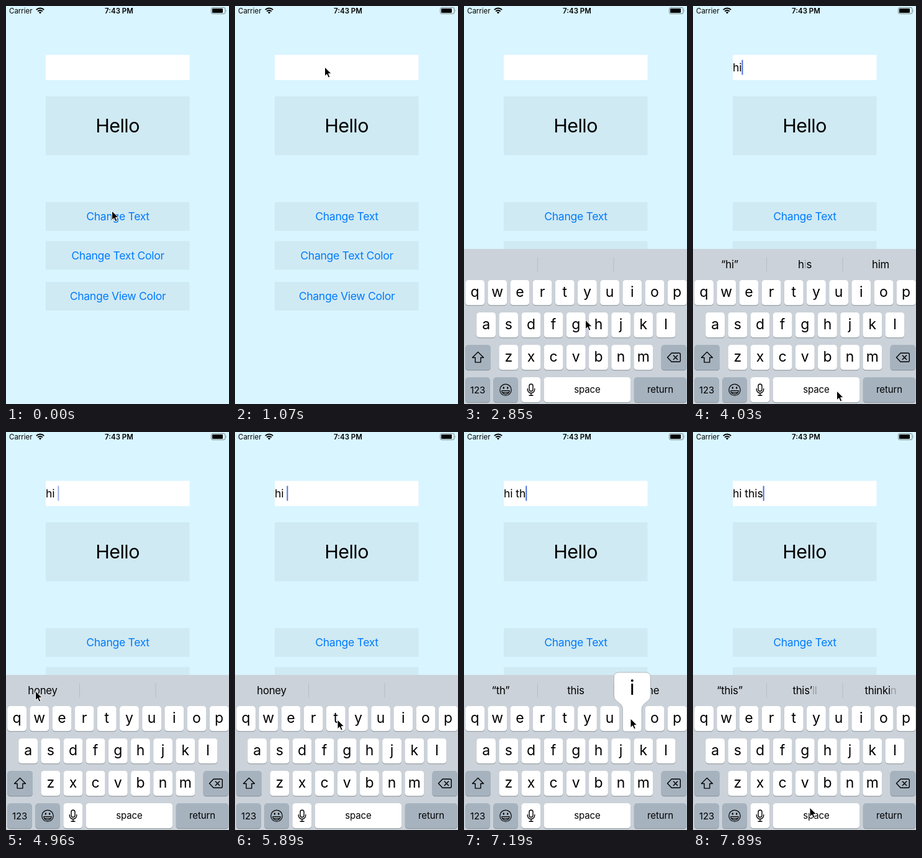
An HTML page that plays this animation: 359 px wide and 639 px high, repeating every 8 s.

```html
<!DOCTYPE html>
<html lang="en">
<head>
<meta charset="utf-8">
<title>Text field demo</title>
<style>
  html, body { margin: 0; width: 100%; height: 100%; overflow: hidden; background: #d9f5ff; }
  svg { display: block; font-family: Inter, "Open Sans", sans-serif; }
  text { white-space: pre; }
  .mid { text-anchor: middle; }
  .button { font-size: 17.6px; letter-spacing: -.32px; fill: #007aff; }
  .letter { font-size: 23px; }
  .word { font-size: 15px; letter-spacing: -.15px; }
  .guess { font-size: 16.8px; letter-spacing: -.25px; }
  .line { fill: none; stroke: #000; stroke-width: 1.4; stroke-linejoin: round; stroke-linecap: round; }
</style>
</head>
<body>
<svg id="stage" width="359" height="639" viewBox="0 0 359 639"></svg>
<script>
const LOOP = 8000, STEP = 117.35, KEYS_START = 1780;
const KEY_W = 30.8, KEY_H = 40.3, PITCH = 36.17;
const keyPos = {};

const rect = (x, y, w, h, fill, r = 0) =>
  `<rect x="${x}" y="${y}" width="${w}" height="${h}" rx="${r}" fill="${fill}"/>`;
const label = (x, y, cls, str, extra = '') => `<text x="${x}" y="${y}" class="${cls}" ${extra}>${str}</text>`;
const button = (y, str) => rect(64, y, 231.5, 46, '#d0eaf3') + label(180, y + 29.3, 'mid button', str);
const keyCap = (x, y, w, fill = '#fff', id = '') =>
  rect(x, y + 1, w, KEY_H, '#878d94', 4.8) +
  `<g id="${id || 'k' + x + y}">${rect(x, y, w, KEY_H, fill, 4.8)}</g>`;
const DARK = '#a6b3bf';

function keyRow(letters, x0, y) {
  return [...letters].map((c, i) => {
    const x = x0 + PITCH * i;
    keyPos[c] = [x, y];
    return keyCap(x, y, KEY_W) + label(x + KEY_W / 2, y + 26.7, 'mid letter', c);
  }).join('');
}

const statusBar = `
  ${label(5, 11.5, '', 'Carrier', 'font-size="11.5"')}
  <g fill="none" stroke="#000" stroke-width="2">
    <path d="M48.8 6.1a8.8 8.8 0 0 1 12.4 0M51.2 8.6a5.4 5.4 0 0 1 7.6 0"/>
  </g>
  <path d="M55 12.6l-2.2-2.3a3.1 3.1 0 0 1 4.4 0z"/>
  ${label(182, 11.5, 'mid', '7:43 PM', 'font-size="11.5" font-weight="600"')}
  <rect x="330.5" y="2.5" width="22.5" height="10" rx="2.4" fill="none" stroke="#000" stroke-opacity=".45"/>
  ${rect(332, 4, 17, 7, '#000', 1)}
  <path d="M354.3 5.7q1.6 1.8 0 3.6z" opacity=".45"/>`;

const icons = `
  <path class="line" d="M22.5 555.5l9 9h-4.6v7.6h-8.8v-7.6h-4.6z"/>
  <path class="line" d="M327.5 564.3l6.6-7h12.2q2 0 2 2v10q0 2-2 2h-12.2zM337.3 561l6.4 6.6m0-6.6l-6.4 6.6"/>
  <g class="line" style="stroke-width:1.2"><circle cx="67" cy="616.3" r="9.2"/>
    <path d="M60.8 617.6h12.4a6.2 5.6 0 0 1-12.4 0zM62 620.5h10"/></g>
  <ellipse cx="63.8" cy="613" rx="1.2" ry="1.8"/><ellipse cx="70.2" cy="613" rx="1.2" ry="1.8"/>
  <rect class="line" x="105" y="607" width="6" height="11.5" rx="3"/>
  <path class="line" d="M102.3 614.5v1.2a5.7 5.7 0 0 0 11.4 0v-1.2M108 621.6v3.6m-3 0h6"/>`;

const keyboard = `
  ${rect(0, 390, 359, 249, '#cbd2d9')}
  ${rect(118, 403.5, 1, 23, '#b5bcc4')}${rect(240.5, 403.5, 1, 23, '#b5bcc4')}
  ${[59, 180, 302].map(x => label(x, 421, 'mid guess', '')).join('')}
  ${keyRow('qwertyuiop', 2.2, 440)}
  ${keyRow('asdfghjkl', 20.2, 492)}
  ${keyRow('zxcvbnm', 56.4, 544)}
  ${keyCap(2.2, 544, 40.8, DARK)}${keyCap(317.6, 544, 40.6, DARK)}
  ${keyCap(2.2, 596, 39.6, DARK)}${keyCap(47.2, 596, 39.6, DARK)}
  ${keyCap(92.4, 596, KEY_W)}${keyCap(128.6, 596, 139.6, '#fff', 'space')}${keyCap(273.8, 596, 84.4, DARK)}
  ${label(22, 621.8, 'mid word', '123')}${label(198.4, 621.3, 'mid word', 'space')}${label(316, 621.3, 'mid word', 'return')}
  ${icons}
  <g id="popup"><path fill="#fff" stroke="#9aa1a8" stroke-width=".7"/>${label(0, 0, 'mid', '', 'font-size="33"')}</g>`;

const $ = sel => document.querySelector(sel);
$('#stage').innerHTML = `
  ${rect(0, 0, 359, 639, '#d9f5ff')}${statusBar}
  ${rect(64, 78.5, 231.5, 40.5, '#fff')}
  ${label(64, 105.2, '', '', 'id="typed" font-size="17.6" letter-spacing="-.1"')}
  <rect id="caret" y="86.5" width="2" height="24" fill="#4a6fe0"/>
  ${rect(64, 145, 231.5, 94.5, '#d0eaf3')}
  ${label(179.5, 203.3, 'mid', 'Hello', 'font-size="30.4" letter-spacing="-.5"')}
  ${button(315, 'Change Text')}${button(377.5, 'Change Text Color')}${button(443, 'Change View Color')}
  <g id="keyboard">${keyboard}</g>
  <path id="pointer" d="M0 0V14.8L3.4 11.6 5.8 17 8.3 15.9 6 10.7H10.7Z" stroke="#fff" stroke-width="1"/>`;

const typed = $('#typed'), caret = $('#caret'), popup = $('#popup');
const guesses = document.querySelectorAll('.guess');

// Pointer stops: time, x, y
const stops = [
  [476, 170.5, 329], [1066, 144.5, 98], [2100, 144.5, 98], [2720, 195.5, 504], [2840, 195.5, 504],
  [3120, 212, 512], [3310, 212, 512], [3660, 268, 460], [3790, 268, 460], [4009, 231.5, 618],
  [4390, 231.5, 618], [4800, 47.5, 416], [4950, 47.5, 416], [5400, 203, 511], [5800, 165, 462],
  [6150, 165, 462], [6590, 221.5, 506], [6830, 221.5, 506], [7060, 268, 460], [7180, 268, 460],
  [7410, 72, 521], [7640, 72, 521], [7880, 188, 603]];

const strokes = [[3300, 'h'], [3780, 'i'], [4380, ' '], [6120, 't'], [6830, 'h'], [7180, 'i'], [7640, 's']];

// Suggestions; letters between underscores are still fading in
const suggestions = [
  [0, '', '', ''], [3420, '“h”', 'has', 'he'], [4000, '“hi”', 'h_i_s', 'him'], [4120, '“hi”', 'his', 'him'],
  [4490, 'honey', '', ''], [6230, '“t”', 'this', 'to'], [6950, '“th”', 'this', 'the'],
  [7290, '“thi”', 'this', 'thinking'], [7870, '“this”', 'this’_ll_', 'thinki_n_']];

const FOCUS = 2000;

function pointerAt(t) {
  const i = stops.findIndex(s => s[0] > t);
  if (i === 0) return stops[0].slice(1);
  if (i < 0) return stops.at(-1).slice(1);
  const [a, b] = [stops[i - 1], stops[i]];
  const u = (t - a[0]) / (b[0] - a[0]), e = u * u * (3 - 2 * u);
  return [a[1] + (b[1] - a[1]) * e, a[2] + (b[2] - a[2]) * e];
}

function blink(u) {
  u %= 1000;
  if (u < 500) return 1;
  return u < 850 ? Math.max(0, 1 - (u - 500) / 150) : (u - 850) / 150;
}

function showPopup(c) {
  const pos = keyPos[c];
  popup.setAttribute('visibility', pos ? 'visible' : 'hidden');
  if (!pos) return;
  const [x, y] = pos, [shape, text] = popup.children;
  shape.setAttribute('d', `M${x} ${y + 36}V${y + 4}q0-5-7-10t-7-10v-30q0-8 8-8h${KEY_W + 12}q8 0 8 8v30q0 5-7 10t-7 10v32q0 5-5 5h${10 - KEY_W}q-5 0-5-5z`);
  text.textContent = c;
  text.setAttribute('x', x + KEY_W / 2);
  text.setAttribute('y', y - 18);
}

function draw(now) {
  const raw = now % LOOP, base = raw < KEYS_START ? 476 : KEYS_START;
  const size = raw < KEYS_START ? 118 : STEP;
  const t = base + Math.floor((raw - base) / size) * size;

  const [px, py] = pointerAt(t);
  $('#pointer').setAttribute('transform', `translate(${px} ${py})`);

  // Critically damped rise
  const w = Math.max(0, t - 1714) * .0183;
  const drop = raw < KEYS_START ? 260 : 249 * (1 + w) * Math.exp(-w);
  $('#keyboard').setAttribute('transform', `translate(0 ${drop})`);

  const done = strokes.filter(s => s[0] <= t);
  typed.textContent = done.map(s => s[1]).join('');
  caret.setAttribute('x', 64 + typed.getComputedTextLength());
  const since = done.length ? done.at(-1)[0] : FOCUS;
  caret.setAttribute('opacity', t < FOCUS ? 0 : blink(t - since));

  const pressed = strokes.find(s => t < s[0] && t >= s[0] - STEP)?.[1];
  showPopup(pressed);
  $('#space rect').setAttribute('fill', pressed === ' ' ? DARK : '#fff');

  const row = suggestions.findLast(s => s[0] <= Math.max(0, t));
  guesses.forEach((g, i) => {
    g.innerHTML = row[i + 1].replace(/_(.+?)_/, '<tspan fill-opacity=".25">$1</tspan>');
  });
}

const start = performance.now();
function tick() {
  draw(performance.now() - start);
  requestAnimationFrame(tick);
}
tick();
</script>
</body>
</html>
```
